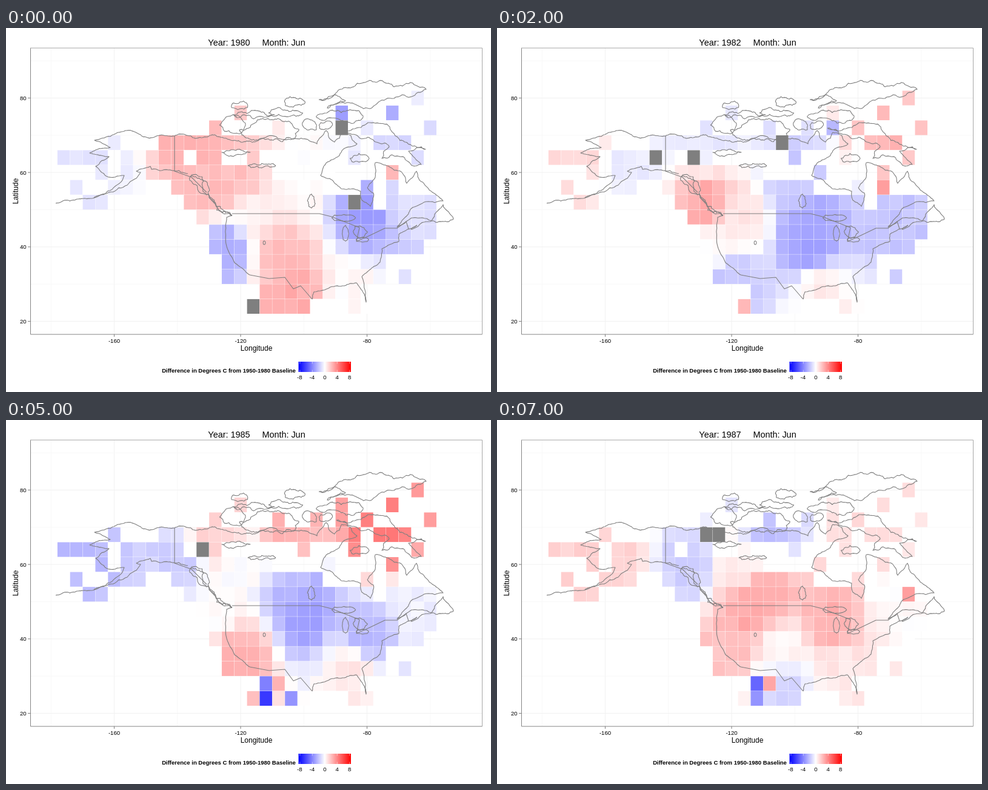
Animation of 800 by 600 pixels, one loop 8 s. Source, as an HTML page:

```html
<!DOCTYPE html>
<html lang="en">
<head>
<meta charset="utf-8">
<title>June temperature difference</title>
<style>
  html, body { margin: 0; width: 100%; height: 100%; overflow: hidden; background: #fff; }
  svg { display: block; width: 800px; height: 600px; font-family: "Liberation Sans", Arial, sans-serif; }
  text { text-anchor: middle; white-space: pre; }
  .tick { font-size: 9.6px; }
  .axis { font-size: 12px; }
  #coast { fill: none; stroke: #7f7f7f; stroke-width: 1.1; stroke-linejoin: round; }
</style>
</head>
<body>
<svg viewBox="0 0 800 600">
  <defs>
    <linearGradient id="scale">
      <stop offset="0" stop-color="#00f"/><stop offset=".5" stop-color="#fff"/><stop offset="1" stop-color="#f00"/>
    </linearGradient>
  </defs>
  <g id="grid"></g>
  <g id="tiles"></g>
  <g id="coast"></g>
  <path d="M40.5 33V505H785.5" fill="none" stroke="#858585"/>
  <path d="M40 33H785.5V505" fill="none" stroke="#a6a6a6"/>
  <text id="title" x="413.5" y="29" font-size="14.4"></text>
  <text class="axis" x="413" y="532">Longitude</text>
  <text class="axis" transform="translate(20 269) rotate(-90)">Latitude</text>
  <text x="367.5" y="568" font-size="9.5" font-weight="bold">Difference in Degrees C from 1950-1980 Baseline</text>
  <rect x="482.5" y="550" width="86.5" height="17" fill="url(#scale)"/>
  <g id="ticks"></g>
</svg>
<script>
const $ = id => document.getElementById(id);
const add = (id, tag, attrs, text) => {
  const el = document.createElementNS("http://www.w3.org/2000/svg", tag);
  for (const k in attrs) el.setAttribute(k, attrs[k]);
  if (text !== undefined) el.textContent = text;
  return $(id).appendChild(el);
};
const lonX = lon => 595.5 + (lon + 80) * 5.2125;
const latY = lat => 115.4 + (80 - lat) * 6.135;

// Grid, ticks and legend labels
for (let lon = -180; lon <= -60; lon += 20) {
  const x = lonX(lon), major = lon % 40 === 0;
  add("grid", "path", { d: `M${x} 33V505`, stroke: major ? "#f1f1f1" : "#f8f8f8" });
  if (!major) continue;
  add("ticks", "path", { d: `M${x} 505v4`, stroke: "#7f7f7f" });
  add("ticks", "text", { class: "tick", x, y: 519 }, lon);
}
for (let lat = 20; lat <= 90; lat += 10) {
  const y = latY(lat), major = lat % 20 === 0;
  add("grid", "path", { d: `M40 ${y}H785`, stroke: major ? "#f1f1f1" : "#f8f8f8" });
  if (!major) continue;
  add("ticks", "path", { d: `M36 ${y}h4`, stroke: "#7f7f7f" });
  add("ticks", "text", { class: "tick", x: 28.3, y: y + 3.6 }, lat);
}
for (let v = -8; v <= 8; v += 4) {
  const x = 525.8 + v * 5.12;
  add("ticks", "path", { d: `M${x} 550v3.4m0 10.2v3.4`, stroke: "#fff", "stroke-width": .5 });
  add("ticks", "text", { class: "tick", x: v < 0 ? x - .5 : x, y: 579 }, v);
}

// Outlines: a few points, roughened by seeded midpoint displacement
let seed = 7;
const rnd = () => (seed = (seed * 16807) % 2147483647) / 2147483647;
const split = (a, b, amp) => {
  const dx = b[0] - a[0], dy = b[1] - a[1];
  if (!amp || Math.hypot(dx, dy) < 4) return [b];
  const k = (rnd() - .5) * amp;
  const m = [(a[0] + b[0]) / 2 - dy * k, (a[1] + b[1]) / 2 + dx * k];
  return [...split(a, m, amp), ...split(m, b, amp)];
};
const trace = (amp, pts) => {
  const out = [pts[0]];
  for (let i = 1; i < pts.length; i++) out.push(...split(pts[i - 1], pts[i], amp));
  add("coast", "path", { d: "M" + out.map(p => p.map(n => n.toFixed(1))).join("L") });
};
const line = (amp, text) => trace(amp, text.split(" ").map(p => p.split(",").map(Number)));
const ring = (x, y, rx, ry, amp = .45) => {
  const pts = Array.from({ length: 8 }, (_, i) => {
    const a = i * Math.PI / 4, k = 1 + (rnd() - .5) * amp;
    return [x + Math.cos(a) * rx * k, y + Math.sin(a) * ry * k];
  });
  trace(amp, [...pts, pts[0]]);
};

// Alaska and the Pacific
line(.2, "278,178 197,169 146,185 172,197 138,206 170,212 148,228 165,244 195,243 175,266 145,280 82,289");
line(.25, "145,280 200,259 222,238 215,236 238,228 240,233 268,234 300,240");
for (let i = 0; i < 3; i++) line(.55, "304,245 334,274 346,291 373,309");
line(.1, "373,309 364,312 364,360 377,387 402,407");
// Gulf and Atlantic
line(0, "402,407 434,413 460,411 474,430 486,425 505,447");
line(.16, "505,447 508,435 535,427 558,425 578,420 594,452 587,410 617,386 620,364 648,352 648,340 678,325");
line(.22, "678,325 668,332 702,318 669,313 645,328 668,298 721,285 698,267 677,236 661,256 652,237 609,222 609,246 596,263");
line(.3, "702,318 721,291 738,315 702,318");
// Hudson Bay and the Arctic shore
line(.2, "596,263 606,272 601,294 587,284 585,269 553,265 519,243 524,228 550,210 556,200");
line(.3, "278,178 312,182 344,176 415,186 470,184 513,191 528,169 542,188 554,172 579,191 556,200");
line(.35, "545,165 597,156 640,174 692,200 664,203 685,225 620,215 632,196 597,180 545,165");
line(.35, "516,118 560,98 640,97 693,101 640,116 590,133 530,132 560,120 516,118");
// Arctic islands
ring(374, 160, 19, 14);
ring(435, 168, 50, 17);
ring(408, 143, 30, 6);
ring(386, 127, 16, 5);
ring(460, 140, 27, 6);
ring(474, 121, 16, 8);
ring(500, 160, 14, 9);
ring(527, 160, 13, 7);
ring(553, 146, 38, 8);
ring(582, 215, 15, 7);
// Lakes
ring(379, 205, 20, 4);
ring(422, 227, 22, 4);
ring(504, 285, 6, 11);
ring(557, 313, 20, 6, .2);
ring(560, 339, 5, 13, .2);
ring(584, 336, 11, 11, .3);
ring(588, 349, 11, 4, .1);
ring(426, 354, 2, 3, .1);
// Borders
line(0, "373,306 517,306 537,311 583,329 578,352 600,342 625,330 645,330 660,319 664,331");
line(0, "278,178 278,236 306,246 331,271");

// Reporting cells by row, north to south; cells are 4 degrees wide and high
const rows = ["28", "14 22 26", "12 17 20 22 24 29", "4 8-23 25-27", "0-3 5-9 11 12 15 19 23 28",
  "3 5-16 21 26", "1 4-6 9-20 24 26", "2 3 10-24 26-29", "11-29", "12-29", "12-28", "13-25",
  "13-25 27", "16-23", "15-19 23 24"];

// field: column, row, strength in %, spread by distance; spots: single cells; grey: no reading
const years = {};
const year = (n, field, spots, grey) => years[n] = { field, spots, grey };
year(1980,
  [10,3,30, 20,3,0, 3,4,-10, 14,5,24, 12,6,26, 18,6,3, 15,8,5, 24,8,-38, 27,7,-13, 13,10,-30, 17,10,25, 18,13,32, 23,13,2],
  [22,1,-38, 26,1,-32, 26,5,28], [22,2, 23,7, 15,14]);
year(1981,
  [2,4,20, 8,4,-18, 16,3,24, 22,3,38, 18,6,2, 13,7,-28, 14,8,-38, 22,8,-11, 26,7,-22, 16,10,9, 23,10,8, 14,12,36, 23,12,26],
  [24,6,-38, 17,14,-48, 18,13,-18], [22,2, 18,3, 11,4, 21,5]);
year(1982,
  [2,4,15, 6,5,-8, 12,3,-9, 26,3,28, 12,7,33, 15,8,10, 19,6,-20, 20,8,-36, 27,8,-23, 13,10,2, 20,10,-37, 14,12,-22, 21,13,7],
  [26,6,38, 15,14,28, 22,2,-28], [18,3, 8,4, 11,4]);
year(1984,
  [5,4,26, 10,3,25, 18,3,34, 11,6,-16, 15,5,10, 19,6,22, 14,8,-17, 18,8,7, 28,8,-22, 14,10,-22, 22,10,25, 18,12,2, 21,13,-9],
  [12,2,55, 3,4,-26, 16,13,-70, 17,14,-45], []);
year(1985,
  [2,4,-26, 12,3,18, 18,3,30, 25,3,52, 9,5,-19, 14,5,0, 18,7,-27, 19,8,-40, 28,8,-6, 12,8,0, 14,11,30, 24,10,-29, 23,12,10],
  [16,13,-50, 17,13,30, 16,14,-78, 18,14,-42], [11,4]);
year(1987,
  [4,4,18, 11,5,-20, 14,5,8, 17,3,-24, 25,3,14, 17,7,30, 15,8,34, 22,9,31, 27,8,2, 14,11,24, 18,11,4, 18,13,-18, 23,12,9],
  [16,13,-60, 17,13,35, 28,7,38, 16,14,-42], [12,3, 13,3]);

const groups = (list, n) => Array.from({ length: list.length / n }, (_, i) => list.slice(i * n, i * n + n));
const valueAt = ({ field, spots, grey }, c, r) => {
  const hit = p => p[0] === c && p[1] === r;
  if (groups(grey, 2).some(hit)) return null;
  const spot = groups(spots, 3).find(hit);
  if (spot) return spot[2];
  let sum = 0, total = 0;
  for (const [x, y, v] of groups(field, 3)) {
    const w = 1 / ((x - c) ** 2 + (y - r) ** 2 + .1) ** 2;
    sum += w * v;
    total += w;
  }
  return sum / total + (rnd() - .5) * 6;
};
// Years without points of their own lie between their neighbours
const reading = (n, c, r) => years[n] ? valueAt(years[n], c, r)
  : (valueAt(years[n - 1], c, r) + valueAt(years[n + 1], c, r)) / 2;
const shade = v => {
  if (v === null) return "#7f7f7f";
  const k = Math.round(255 * (1 - Math.abs(v) / 100));
  return v < 0 ? `rgb(${k},${k},255)` : `rgb(255,${k},${k})`;
};

const tiles = [];
rows.forEach((row, r) => row.split(" ").forEach(run => {
  const [a, b = a] = run.split("-").map(Number);
  for (let c = a; c <= b; c++) {
    const el = add("tiles", "rect", {
      x: lonX(4 * c - 178) + .2, y: latY(82 - 4 * r) + .2, width: 20.45, height: 24.14
    });
    const fills = Array.from({ length: 8 }, (_, i) => shade(reading(1980 + i, c, r)));
    tiles.push({ el, fills });
  }
}));

let shown = -1;
const draw = () => {
  const i = Math.floor(performance.now() / 1000) % 8;
  if (i !== shown) {
    shown = i;
    $("title").textContent = `Year: ${1980 + i}     Month: Jun`;
    for (const t of tiles) t.el.setAttribute("fill", t.fills[i]);
  }
  requestAnimationFrame(draw);
};
draw();
</script>
</body>
</html>
```
